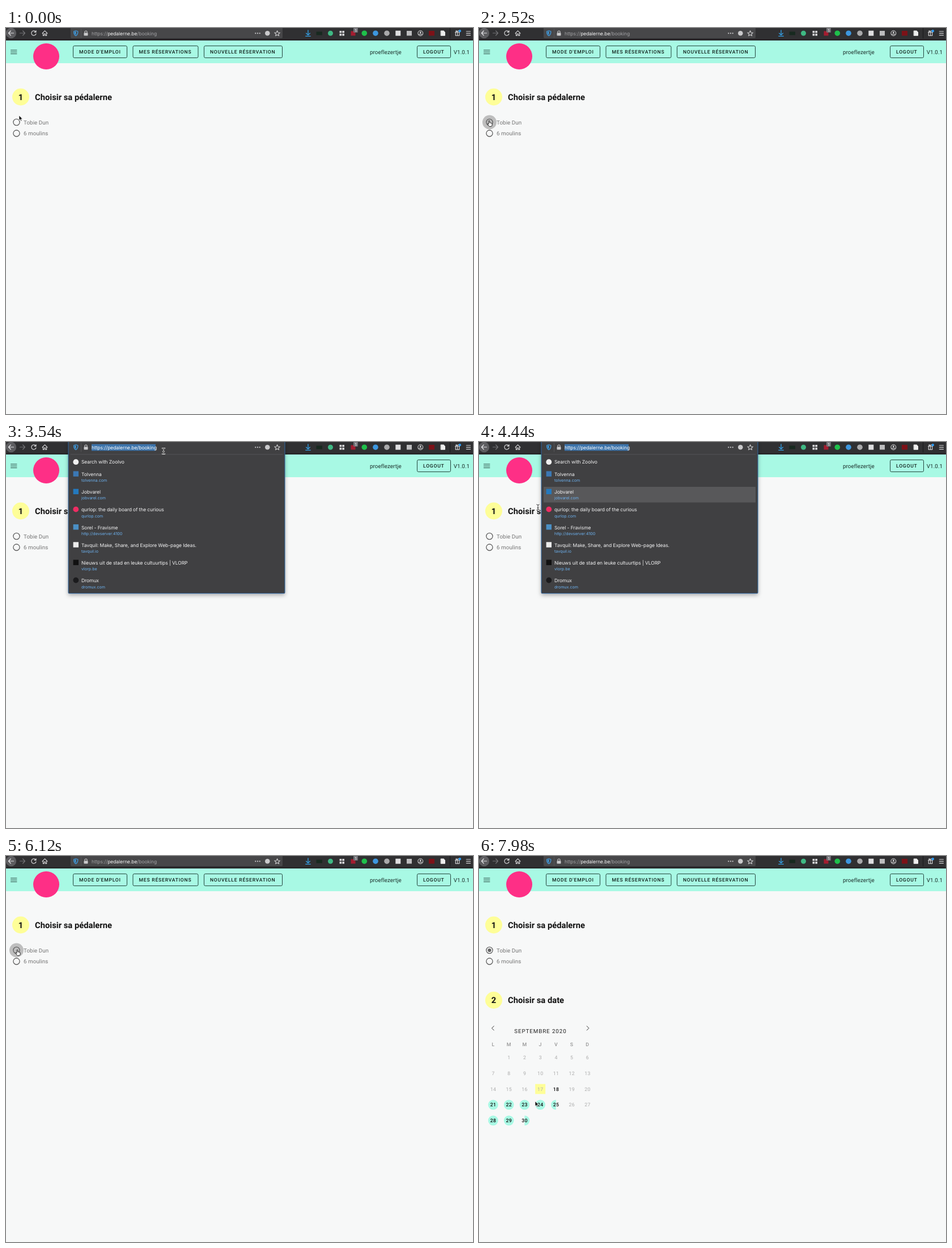
Animation of 824x680 px, one loop 8 s. Source, as an HTML page:

```html
<!DOCTYPE html>
<html lang="fr">
<head>
<meta charset="utf-8">
<title>Réservation</title>
<style>
  html, body { margin: 0; width: 100%; height: 100%; overflow: hidden; background: #f7f8f8; }
  svg { display: block; width: 824px; height: 680px; }
  text { font-family: Roboto, sans-serif; text-rendering: geometricPrecision; white-space: pre; }
  .ui { font: 8.5px Inter, sans-serif; letter-spacing: -.08px; }
  .body { font-size: 9.82px; letter-spacing: .06px; }
  .btn { font-size: 8.6px; font-weight: 500; letter-spacing: .768px; fill: #12201d; }
  .title { font-size: 14.75px; font-weight: 700; fill: #111; }
  .month { font-size: 9.82px; letter-spacing: .9px; fill: #222; }
  .day { font-size: 8.8px; letter-spacing: .25px; }
  .mid { text-anchor: middle; }
  .line { fill: none; stroke-linecap: round; stroke-linejoin: round; }
</style>
</head>
<body>
<svg id="stage" viewBox="0 0 824 680" xmlns="http://www.w3.org/2000/svg"></svg>
<script>
const LOOP = 8000, STEP = 60;
const MINT = '#a8f9e4', YELLOW = '#fefe98', PINK = '#fe2f86';

// Markup helpers
const rect = (x, y, w, h, fill, more = '') =>
  `<rect x="${x}" y="${y}" width="${w}" height="${h}" fill="${fill}" ${more}/>`;
const disc = (x, y, r, fill, more = '') =>
  `<circle cx="${x}" cy="${y}" r="${r}" fill="${fill}" ${more}/>`;
const line = (d, color, w = 1, more = '') =>
  `<path class="line" d="${d}" stroke="${color}" stroke-width="${w}" ${more}/>`;
const text = (x, y, str, cls, fill = '', more = '') =>
  `<text x="${x}" y="${y}" class="${cls}" ${fill && `fill="${fill}"`} ${more}>${str}</text>`;
const group = (id, body, more = '') => `<g id="${id}" ${more}>${body}</g>`;

function toolbar() {
  const ink = '#d4d4d6';
  return rect(0, 0, 824, 22, '#303032') + rect(0, 19.5, 824, 2.5, '#272729')
    + disc(9, 9, 9.2, '#5d5d60')
    + line('M13.5 9H4.5M8.3 5L4.5 9L8.3 13', '#e4e4e6', 1.2)
    + line('M24.5 9H33.5M29.7 5L33.5 9L29.7 13', '#737376', 1.2)
    + line('M52.3 6.6A4.1 4.1 0 1 0 53 10M53 4.6V7.4H50', ink, 1.2)
    + line('M64 9.3L68.5 4.8L73 9.3M65.4 8.6V13.4H67.4V10.4H69.6V13.4H71.6V8.6', ink, 1.1)
    + line('M533 4V12.3M529.7 9.2L533 12.4L536.3 9.2M528.8 14.4H537.2', '#35a5ee', 1.3)
    + rect(547.5, 6.5, 10.5, 6, '#17291f')
    + disc(572.5, 9.2, 4.5, '#3fb984')
    + [[588.5, 5], [593.3, 5], [588.5, 10], [593.3, 10]].map(([x, y]) => rect(x, y, 3.7, 3.7, ink)).join('')
    + rect(608.5, 5.5, 8, 8, '#a31d30')
    + rect(613, 0, 8, 8, '#737378', 'rx="1"') + text(617, 6.6, '1', 'ui mid', '#fff', 'style="font-size:7px"')
    + disc(632.3, 9.2, 4.8, '#1fc04b')
    + disc(652, 9.2, 4.8, '#3d97e0')
    + disc(672, 9.2, 4.8, '#a9a9ab')
    + rect(687.3, 4.7, 9, 9, '#dedee0')
    + rect(707, 5, 9, 8.5, '#bdbdbf')
    + disc(731.3, 9.2, 4.4, 'none', `stroke="${ink}" stroke-width="1.1"`)
    + disc(731.3, 7.8, 1.5, ink) + line('M728.8 11.3Q731.3 9.8 733.8 11.3', ink, 1.3)
    + rect(746, 5, 10, 8.5, '#7c1218')
    + line('M767.5 5H772.3L774.5 7.2V13.3H767.5Z', '#eee', 1, 'style="fill:#eee"')
    + line('M783.5 0V18', '#19191b', 1)
    + line('M792.5 7.5H800.5M793.3 8V13.5H799.7V8M796.5 7.5V13.5M796.5 7Q793 6.8 794 5Q796 4.2 796.5 7Q797 4.2 799 5', ink, 1.2)
    + disc(800.8, 5.2, 2.2, '#2f9cf4')
    + line('M812.3 6H819.5M812.3 9.3H819.5M812.3 12.6H819.5', ink, 1.2);
}

function addressBar() {
  const ink = '#c9c9cb';
  return line('M123.2 4.8L126.8 6Q127 11.6 123.2 13.7Q119.4 11.6 119.6 6Z', '#3fa0e8', 1.2)
    + line('M123.2 6.6V11.8Q121 10.4 121.2 7.3Z', '#3fa0e8', .5, 'style="fill:#3fa0e8"')
    + line('M132.5 2V17', '#5b5b5e', .8)
    + rect(137.5, 8.6, 7, 5, ink, 'rx=".8"') + line('M139 8.5V7A2 2 0 0 1 143 7V8.5', ink, 1.2)
    + [440.3, 444, 447.7].map(x => disc(x, 9.3, 1.15, ink)).join('')
    + disc(461.3, 9.2, 4.3, ink)
    + line('M478.6 4.8L480 8L483.4 8.3L480.8 10.5L481.6 13.8L478.6 12L475.6 13.8L476.4 10.5L473.8 8.3L477.2 8Z', ink, 1.1);
}

function header() {
  const button = (x, w, label) =>
    rect(x + .5, 31.5, w, 21, 'none', 'rx="2.2" stroke="#1d3a34" stroke-width=".95"')
    + text(x + 11, 45.2, label, 'btn');
  return rect(0, 22, 824, 40, MINT)
    + line('M8.5 39H19M8.5 42.2H19M8.5 45.4H19', '#27443e', 1)
    + disc(71, 50, 23, PINK)
    + button(118, 95, "MODE D'EMPLOI")
    + button(223.5, 115, 'MES RÉSERVATIONS')
    + button(349, 138, 'NOUVELLE RÉSERVATION')
    + text(642, 45.6, 'proeflezertje', 'body', '#1c2f2b')
    + button(725, 59, 'LOGOUT')
    + text(789.8, 45.6, 'V1.0.1', 'body', '#1c2f2b');
}

const heading = (y, n, label) =>
  disc(26, y, 15, YELLOW) + text(26, y + 5.2, n, 'title mid') + text(51, y + 5.2, label, 'title');

const radio = (y, label) =>
  disc(18.5, y, 5.6, 'none', 'stroke="#626262" stroke-width="1.35"')
  + text(31, y + 3.5, label, 'body', '#757575');

function calendar() {
  const colX = c => 25 + c * 27.72, rowY = r => 355 + r * 27.75;
  let out = heading(254, 2, 'Choisir sa date')
    + line('M26.3 299.6L22.6 303.3L26.3 307', '#333', 1)
    + line('M190.2 299.6L193.9 303.3L190.2 307', '#333', 1)
    + text(108.4, 311.7, 'SEPTEMBRE 2020', 'month mid');
  [...'LMMJVSD'].forEach((d, c) =>
    out += text(colX(c), 334.6, d, 'day mid', '#969696', 'font-weight="500"'));
  for (let n = 1; n <= 30; n++) {
    const c = n % 7, r = Math.floor(n / 7), x = colX(c), y = rowY(r);
    const open = n === 18 || (n > 20 && n !== 26 && n !== 27);
    const half = s => `<path d="M${x} ${y - 8.8}A8.8 8.8 0 0 ${s} ${x} ${y + 8.8}Z" fill="${MINT}"/>`;
    if (n === 17) out += rect(x - 9, y - 8.8, 18, 17.6, YELLOW);
    else if (n === 25) out += half(0);
    else if (n === 30) out += half(1);
    else if (open && n > 20) out += disc(x, y, 8.8, MINT);
    out += text(x + .1, y + 3.1, n, 'day mid', open ? '#111' : '#adadad', open ? 'font-weight="500"' : '');
  }
  return out;
}

const SITES = [
  ['Tolvenna', 'tolvenna.com', '#3b78b4'],
  ['Jobvarel', 'jobvarel.com', '#2479bd'],
  ['qurlop: the daily board of the curious', 'qurlop.com', '#ee2d63', true],
  ['Sorel - Fravisme', 'http://devserver:4100', '#4a8fc4'],
  ['Tavquil: Make, Share, and Explore Web-page Ideas.', 'tavquil.io', '#ececec'],
  ['Nieuws uit de stad en leuke cultuurtips | VLORP', 'vlorp.be', '#111'],
  ['Dromux', 'dromux.com', '#1b1b1d', true],
];

function dropdown() {
  let out = rect(110, -4, 382, 270.7, '#414143', 'rx="1.5" stroke="#2f649c" stroke-width="1" filter="url(#soft)"')
    + line('M114 21.8H488', '#5a5a5d', .8)
    + group('rowHover', rect(114, 79, 374, 27.5, '#58585a'))
    + disc(123.3, 35.2, 4.9, '#f0f0f0')
    + text(133, 38.4, 'Search with Zoolvo', 'ui', '#f4f4f5');
  SITES.forEach(([name, url, color, round], i) => {
    const y = 56.8 + i * 31.22;
    out += round ? disc(123.3, y - .6, 4.9, color) : rect(118.6, y - 5.4, 9.4, 9.4, color);
    out += text(133, y + 3.1, name, 'ui', '#f4f4f5')
      + text(133, y + 13.4, url, 'ui', '#6db3f2', 'style="font-size:7.1px;letter-spacing:0"');
  });
  return out + rect(151, 3.8, 113, 11.6, '#3d74ab')
    + text(151, 12.7, 'https://pedalerne.be/booking', 'ui', '#fff');
}

const ARROW = 'M0 0V8.7L2 6.9L3.4 9.9L4.9 9.2L3.5 6.3H6.2Z';
const HAND = 'M0 .6Q0-.4 .9-.4T1.8 .6V3.4Q2.9 3 3.4 3.8Q4.4 3.4 4.9 4.3Q6.1 4.1 6.1 5.4V7.4Q6.1 9.8 4.2 10H1.8Q.8 10 0 8.7L-2 5.8Q-2.2 4.6 -1.2 4.8L0 6Z';
const BEAM = 'M-2.3-5Q0-5 0-3.4V3.4Q0 5-2.3 5M2.3-5Q0-5 0-3.4M0 3.4Q0 5 2.3 5M-1.2 1H1.2';

document.getElementById('stage').innerHTML =
  `<defs><filter id="soft" x="-10%" y="-10%" width="120%" height="120%">
    <feDropShadow dx="0" dy="3" stdDeviation="3.5" flood-color="#000" flood-opacity=".3"/></filter></defs>`
  + rect(0, 0, 824, 680, '#f7f8f8')
  + header()
  + heading(121.5, 1, 'Choisir sa pédalerne')
  + group('halo', disc(18.5, 166, 12.5, '#000', 'fill-opacity=".23"'))
  + radio(166, 'Tobie Dun') + radio(185.6, '6 moulins')
  + group('dot', disc(18.5, 166, 3.1, '#626262'))
  + group('calendar', calendar())
  + toolbar()
  + group('field', rect(114, -3, 374, 21, '#474749', 'rx="2"')
    + text(151, 12.7, 'https://<tspan fill="#f4f4f5">pedalerne.be</tspan>/booking', 'ui', '#a2a2a5'))
  + group('menu', dropdown())
  + addressBar()
  + group('cursor',
    group('arrow', `<path d="${ARROW}" fill="#111" stroke="#fff" stroke-width=".7"/>`)
    + group('hand', `<path d="${HAND}" fill="#fff" stroke="#111" stroke-width=".9"/>`)
    + group('beam', line(BEAM, '#fff', 1.9) + line(BEAM, '#222', .9)));

// Pointer path: time, x, y
const PATH = [
  [0, 23, 154], [120, 22, 155], [300, 18, 161], [540, 17, 163.5], [2460, 17, 163.5],
  [2520, 17, 163.5], [2700, 40, 140], [2940, 150, 70], [3180, 262, 22], [3300, 278, 16],
  [4260, 278, 16], [4320, 236, 40], [4380, 148, 91], [4440, 104, 115], [4620, 82, 138],
  [5100, 78, 142], [5280, 50, 156], [5460, 24, 164], [5640, 19, 165.5], [6840, 19, 165.5],
  [6960, 42, 173], [7020, 59, 179], [7260, 84, 270], [7500, 98, 378], [7740, 99, 424], [7980, 99, 432],
];
// Hover halo strength: time, opacity
const HALO = [
  [180, 0], [420, 1], [2580, 1], [2760, 0], [5340, 0], [5580, 1], [6840, 1], [7020, 0],
];
// Pointer shape from a given time on
const SHAPES = [
  [0, 'arrow'], [240, 'hand'], [2640, 'arrow'], [3180, 'beam'], [4320, 'arrow'],
  [4440, 'beam'], [4620, 'arrow'], [5400, 'hand'], [6900, 'arrow'],
];

function sample(keys, t) {
  const i = keys.findIndex(k => k[0] > t);
  if (i === 0) return keys[0].slice(1);
  if (i < 0) return keys[keys.length - 1].slice(1);
  const a = keys[i - 1], b = keys[i], p = (t - a[0]) / (b[0] - a[0]);
  return a.slice(1).map((v, j) => v + (b[j + 1] - v) * p);
}

const el = id => document.getElementById(id);
const show = (id, on) => el(id).setAttribute('visibility', on ? 'visible' : 'hidden');

function draw(time) {
  const t = Math.floor((time % LOOP) / STEP) * STEP;
  const [x, y] = sample(PATH, t);
  const shape = SHAPES.filter(s => s[0] <= t).pop()[1];
  const open = t >= 3420 && t < 4920;
  el('cursor').setAttribute('transform', `translate(${x.toFixed(2)} ${y.toFixed(2)})`);
  ['arrow', 'hand', 'beam'].forEach(id => show(id, id === shape));
  el('halo').setAttribute('opacity', sample(HALO, t)[0]);
  show('menu', open);
  show('rowHover', open && t >= 4380);
  show('dot', t >= 6240);
  show('calendar', t >= 6480);
}

const start = performance.now();
function tick() {
  draw(performance.now() - start);
  requestAnimationFrame(tick);
}
tick();
</script>
</body>
</html>
```
